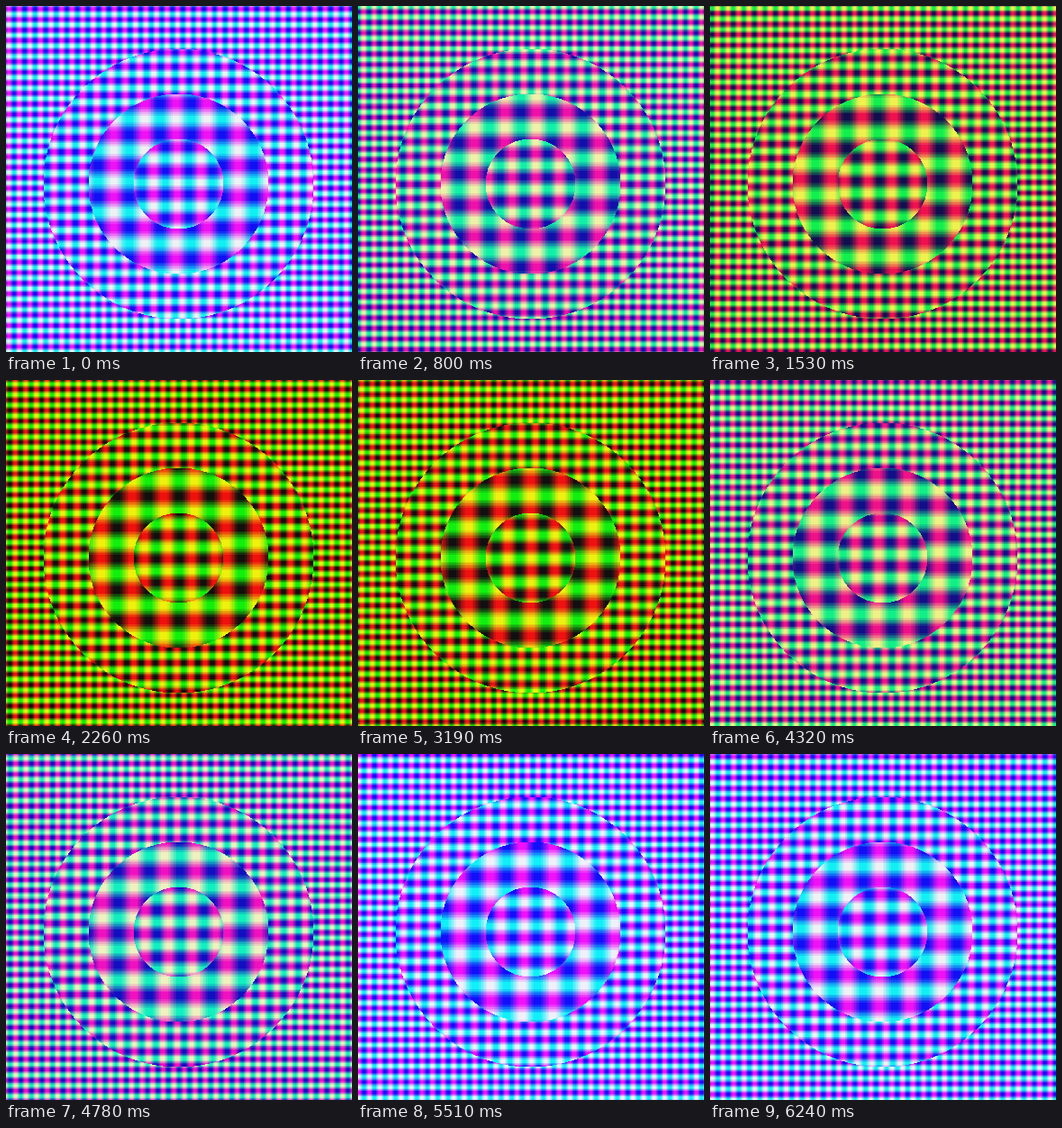
An HTML page with a canvas that plays this animation: 384x384 px, repeating every 6310 ms.

```html
<!DOCTYPE html>
<html lang="en">
<head>
<meta charset="utf-8">
<title>Ring lens waves</title>
<style>
  html, body { margin: 0; width: 100%; height: 100%; overflow: hidden; background: #000; }
  canvas { display: block; width: 100%; height: 100%; }
</style>
</head>
<body>
<canvas id="stage" width="384" height="384"></canvas>
<script>
  const SIZE = 384;
  const CX = 191, CY = 197;
  const RING = 50;
  const LOOP = 6310, STEP = 66.4, FPS = 15;
  const BANDS = 8;

  // Wavelength and phase at the centre, from the inner disc outwards
  const RINGS = [
    { period: 26.15, phase: 0.36 },
    { period: 34.5, phase: 0.55 },
    { period: 15.8, phase: 4.65 },
    { period: 11.71, phase: 0.55 }
  ];

  const ctx = document.getElementById('stage').getContext('2d');
  const image = ctx.createImageData(SIZE, SIZE);
  const data = image.data;
  const zones = new Uint8Array(SIZE * SIZE);

  for (let y = 0, i = 0; y < SIZE; y++) {
    for (let x = 0; x < SIZE; x++, i++) {
      zones[i] = Math.min(3, Math.floor(Math.hypot(x - CX, y - CY) / RING));
      data[i * 4 + 3] = 255;
    }
  }

  const unit = angle => 0.5 + 0.5 * Math.cos(angle);
  const band = v => (Math.min(BANDS - 1, Math.floor(v * BANDS)) + 0.5) * 256 / BANDS;

  function wave(centre, ring, t) {
    const k = 2 * Math.PI / ring.period;
    return Float32Array.from({ length: SIZE },
      (_, p) => band(unit(k * (p - centre) + ring.phase - 10 * t)));
  }

  function draw(t) {
    const reds = RINGS.map(ring => wave(CX, ring, t));
    const greens = RINGS.map(ring => wave(CY, ring, t));
    const blue = 255 * unit(t + 0.44);
    for (let y = 0, i = 0; y < SIZE; y++) {
      for (let x = 0; x < SIZE; x++, i++) {
        const zone = zones[i];
        data[i * 4] = reds[zone][x];
        data[i * 4 + 1] = greens[zone][y];
        data[i * 4 + 2] = blue;
      }
    }
    ctx.putImageData(image, 0, 0);
  }

  const start = performance.now();
  let shown = -1;

  function tick() {
    const ms = (performance.now() - start) % LOOP;
    const step = Math.min(94, Math.floor((ms + 3) / STEP));
    if (step !== shown) draw((shown = step) / FPS);
    requestAnimationFrame(tick);
  }
  tick();
</script>
</body>
</html>
```
